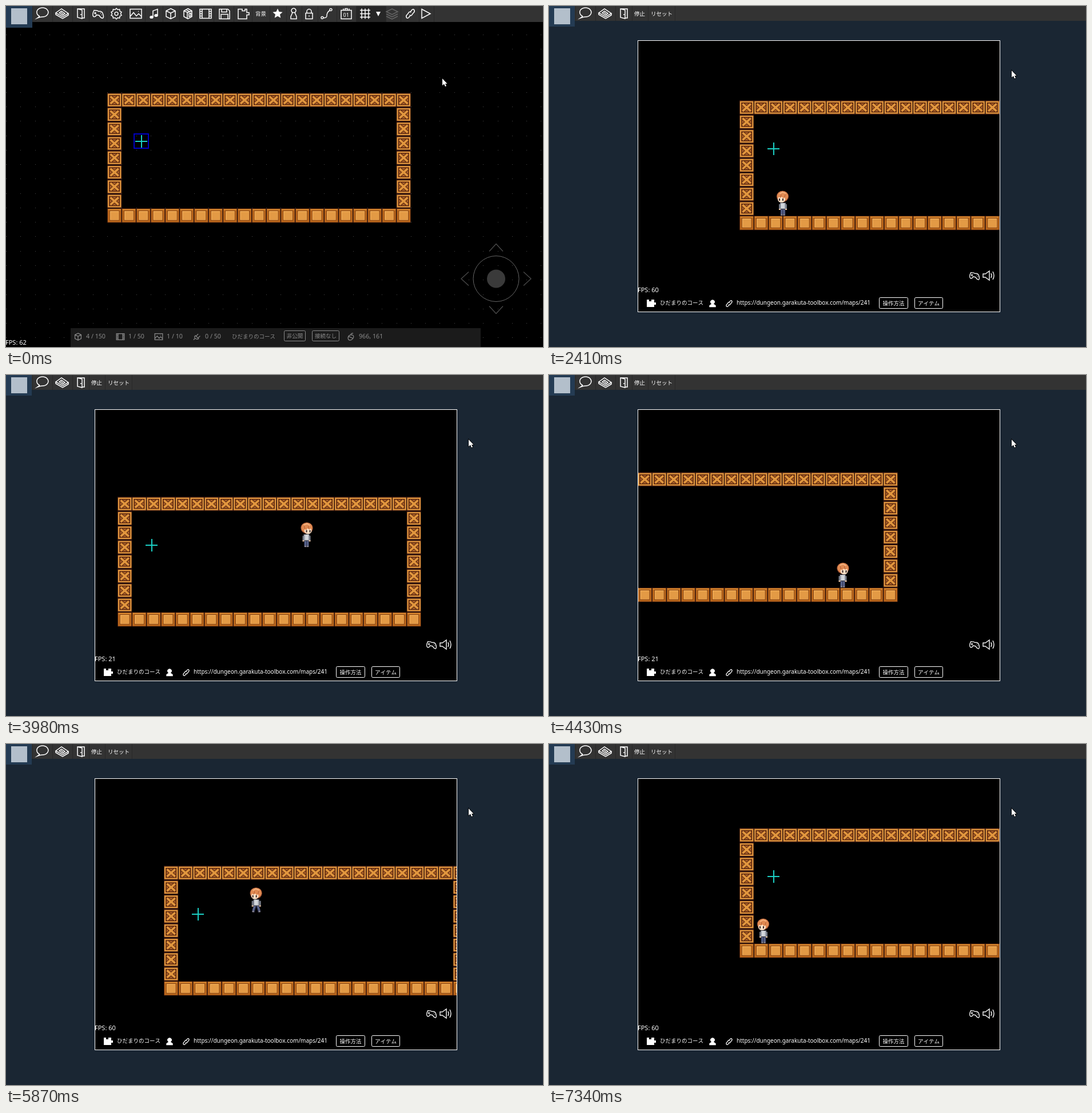
An HTML page with a canvas that plays this animation: 939 by 597 pixels, repeating every 7.9 s.

```html
<!DOCTYPE html>
<html lang="ja">
<head>
<meta charset="utf-8">
<style>
html, body { margin: 0; width: 100%; height: 100%; overflow: hidden; background: #000; }
canvas { display: block; }
</style>
</head>
<body>
<canvas id="stage" width="939" height="597"></canvas>
<script>
const c = document.getElementById('stage').getContext('2d');
const LOOP = 7900, TILE = 25.28, SPEED = 0.222;
const FONT = '"Noto Sans", "Noto Sans CJK JP", "Noto Sans CJK", sans-serif';
const TITLE = 'ひだまりのコース';
const clamp = (v, a, b) => Math.min(b, Math.max(a, v));

const beats = [[0, 1], [530, 8], [1210, 9], [2010, 5], [2410, 5], [2850, 7], [3460, 3], [3720, 8],
  [4430, 2], [4600, 10], [5460, 5], [5870, 5], [6310, 10], [7160, 2], [7340, 1], [LOOP, 1]];

function snap(t) {
  const i = beats.findIndex(b => b[0] > t) - 1;
  const [start, steps] = beats[i];
  const size = (beats[i + 1][0] - start) / steps;
  return start + Math.floor((t - start) / size + 1e-6) * size;
}

// Drawing helpers
function rect(x, y, w, h, color) {
  c.fillStyle = color;
  c.fillRect(x, y, w, h);
}

function line(color, width, ...pts) {
  c.strokeStyle = color;
  c.lineWidth = width;
  c.beginPath();
  for (let i = 0; i < pts.length; i += 2) c.lineTo(pts[i], pts[i + 1]);
  c.stroke();
}

function oval(x, y, rx, ry, color) {
  c.fillStyle = color;
  c.beginPath();
  c.ellipse(x, y, rx, ry, 0, 0, 7);
  c.fill();
}

function arc(x, y, r, from, to, color, width) {
  c.strokeStyle = color;
  c.lineWidth = width;
  c.beginPath();
  c.arc(x, y, r, from, to);
  c.stroke();
}

function text(s, x, y, color = '#fff', size = 9.5) {
  c.font = size + 'px ' + FONT;
  c.fillStyle = color;
  c.fillText(s, x, y);
}

function button(s, x, y, w, h, color) {
  c.strokeStyle = color;
  c.lineWidth = 1;
  c.beginPath();
  c.roundRect(x + .5, y + .5, w, h, 2);
  c.stroke();
  c.textAlign = 'center';
  text(s, x + w / 2 + .5, y + h / 2 + 4, color);
  c.textAlign = 'left';
}

const ring = (n, out, inn) => 'M' + Array.from({ length: n }, (_, i) => {
  const a = i * 2 * Math.PI / n - Math.PI / 2, r = i % 2 ? inn : out;
  return (r * Math.cos(a)).toFixed(1) + ' ' + (r * Math.sin(a)).toFixed(1);
}).join('L') + 'Z';

const icons = {
  chat: 'M-5 6A10 8 0 1 1 0 7Q-4 7-9 9L-5 6',
  book: 'M-11-1L-1-8 11 0 1 6ZM-11-1V2L1 9 11 3V0M-5-1L-1-4 5 0 1 3ZM-2-2L2 1',
  door: 'M-2-8H6V8H2M-6-8L2-6V9L-6 7ZM-6-8H6M0 1V3',
  pad: 'M-7-6Q-1-6 1-4 6-5 8-1 11 6 8 8 5 8 2 3L-3 2Q-4 6-8 5-11 2-7-6ZM-7-1L-3-1M-5-3V1M4-1h1M6 2h1',
  gear: ring(20, 9.5, 7.5) + 'M3 0A3 3 0 1 1 3-.1',
  image: 'M-10-8H10V8H-10ZM-10 5L-4-2 1 4 5 0 10 5M4-4h1',
  cube: 'M0-9L8-5V5L0 9-8 5V-5ZM-8-5L0-1 8-5M0-1V9',
  boxes: 'M0-9L7-5V5L0 9-7 5V-5ZM-7-5L0-2 7-5M-1-2V8M-3-7L4-3M2 0L5-1V4L2 5Z',
  film: 'M-10-8H10V8H-10ZM-6-8V8M6-8V8M-10-4h4M-10 0h4M-10 4h4M6-4h4M6 0h4M6 4h4',
  disk: 'M-9-8H6L9-5V9H-9ZM-5-8V-3H4V-8M-6 9V1H6V9',
  piece: 'M-9-8H-2V-5H3V-8H6V-2H10V2H6V9H-9Z',
  pawn: 'M2-2A4 4 0 1 0-2-2L-5 5V9H5V5ZM-2-2H2',
  lock: 'M-6-1H6V9H-6ZM-4-1V-4A4 4 0 0 1 4-4V-1M0 3V5',
  path: 'M-6 7Q1 8 0 2 1-4 6-6M-6 7A2 2 0 1 1-6 6.9M9-7A2 2 0 1 1 9-7.1',
  date: 'M-9-6H9V9H-9ZM-5-9V-6M5-9V-6M-2-6V-9H2V-6',
  grid: 'M-9-6H9M-9 0H9M-9 6H9M-6-9V9M0-9V9M6-9V9',
  layers: 'M0-8L10-3 0 2-10-3ZM-10 1L0 6 10 1M-10 5L0 10 10 5',
  link: 'M0-3L3-7Q6-9 7-6T5-1L2 3Q0 4-1 2M0 3L-3 7Q-6 9-7 6T-5 1L-2-3Q0-4 1-2',
  play: 'M-7-8L8 0-7 8Z',
  plug: 'M-9 8L-5 4M-5 4Q-8 0-4-3L4 5Q0 8-5 4M-2-2L3-7M3 3L8-2',
  mouse: 'M-7 5Q-8-3 0-5 8-5 7 1 5 8-2 9-6 9-7 5ZM-6-1L5 4M0-5Q0-9 6-9',
  sound: 'M-10-3H-6L1-8V8L-6 3H-10ZM4-4Q6 0 4 4M7-7Q11 0 7 7',
  note: 'M-2 6V-5L6-8V3',
  star: ring(10, 9, 4.2),
  block: 'M-8-6H-4V-3H0V-6H5V-1H8V3H5V7H-8Z',
  person: 'M-2 1Q-5-1-4-4 0-9 4-4 5-1 2 1L6 4V7H-6V4Z'
};
for (const k in icons) icons[k] = new Path2D(icons[k]);

function icon(name, x, y, color = '#fff', size = 1, solid = false) {
  c.save();
  c.translate(x, y);
  c.scale(size, size);
  c.lineWidth = 1.5 / Math.sqrt(size);
  c.strokeStyle = c.fillStyle = color;
  solid ? c.fill(icons[name]) : c.stroke(icons[name]);
  c.restore();
}

// Map, in pixels from its top left corner
function crate(col, row) {
  c.save();
  c.translate(col * TILE, row * TILE);
  c.scale(TILE / 32, TILE / 32);
  rect(0, 0, 32, 32, '#32140f');
  if (row === 8) {
    rect(1, 1, 30, 30, '#b9661b');
    rect(2, 2, 28, 2, '#d98c35');
    rect(5, 5, 22, 22, '#7a3a0f');
    rect(6, 6, 20, 20, '#f0ab55');
    rect(8, 8, 17, 17, '#e39a45');
  } else {
    rect(1, 2, 30, 28, '#e1963e');
    rect(4, 5, 24, 22, '#5a260f');
    rect(6, 7, 20, 18, '#b0652a');
    for (const [color, width] of [['#5a260f', 7.5], ['#e1963e', 4.8]]) {
      line(color, width, 25, 8, 7, 24);
      line(color, width, 7, 8, 25, 24);
    }
  }
  c.restore();
}

function map(marked) {
  for (let row = 0; row < 9; row++)
    for (let col = 0; col < 21; col += row % 8 ? 20 : 1) crate(col, row);
  if (marked) {
    c.strokeStyle = '#0000c4';
    c.lineWidth = 2;
    c.strokeRect(47, 72, 25, 25);
  }
  line('#1bcfc4', 2, 49, 85, 70, 85);
  line('#1bcfc4', 2, 60, 74, 60, 96);
}

// Motion of the player and of the camera trailing behind
const walks = [[2751, 4366, 1], [4641, 6409, -1]];
const walkX = t => walks.reduce((x, [from, to, dir]) => x + dir * SPEED * (clamp(t, from, to) - from), 76);

function jump(t, start) {
  const u = clamp((t - start) / 495, 0, 2);
  return 126 * u * (2 - u);
}

const lift = t => Math.max(0, 92 - .000525 * Math.max(0, t - 1780) ** 2) + jump(t, 3247) + jump(t, 5270);

function camera(t) {
  let x = 76, y = 92;
  for (let s = 1700; s < t; s += 10) {
    x += (walkX(s) - x) * .05;
    y += (lift(s) - y) * .05;
  }
  return [Math.round(Math.min(333, 482 - x)), Math.round(Math.min(213, 147 + y))];
}

function player(t) {
  const right = t > walks[0][0] && t < walks[1][0];
  const moving = walks.some(([from, to]) => t > from && t < to);
  const step = moving ? [0, 1, 0, -1][Math.floor((t - 3400) / 180 + 20) % 4] : 0;
  c.save();
  c.translate(walkX(t), 202 - lift(t));
  if (right) c.scale(-1, 1);
  // legs
  for (const side of [-1, 1]) {
    const foot = side * (2 + 3.5 * Math.abs(step));
    line('#282a45', 5, side * 1.8, -13, foot, -.3);
    line('#58648c', 3.2, side * 1.8, -13, foot, -3);
    line('#8d8a94', 2.5, foot - 1.5, -1.5, foot + 1.5, -1.5);
  }
  // body and arms
  rect(-5.5, -23, 11, 12, '#33333d');
  rect(-4.5, -22, 9, 10, '#b7bcc5');
  rect(-3, -22, 5, 9, '#d3d7dc');
  rect(-7 - step, -20, 3, 9, '#777d89');
  rect(4 + step, -20, 3, 9, '#777d89');
  rect(-7 - step, -12, 3, 2, '#f2c8a5');
  rect(4 + step, -12, 3, 2, '#f2c8a5');
  // head
  oval(-.5, -33.5, 10.7, 10, '#84432a');
  oval(-.5, -34, 9.8, 9, '#e08a52');
  oval(-2.5, -28.5, 6.5, 5.5, '#fbe0c6');
  c.fillStyle = '#e08a52';
  c.beginPath();
  c.moveTo(-9.5, -36);
  for (const [x, y] of [[-10, -30], [-7, -33], [-5, -31], [-2, -33], [1, -30], [3, -32], [5, -27], [9, -34]]) c.lineTo(x, y);
  c.fill();
  line('#f6b988', 1.5, -6, -38, -1, -41, 5, -39);
  line('#ad5c35', 1, -3, -37, -4, -32);
  line('#ad5c35', 1, 4, -37, 3, -32);
  rect(-7, -30, 2, 4, '#3a2a2a');
  rect(-1, -30, 2, 4, '#3a2a2a');
  c.restore();
}

// Toolbars
function toolbar(dividers, extra) {
  const height = 26 + extra * 2;
  rect(0, 0, 939, height, '#333');
  for (const x of dividers) rect(x, 0, 1, height, '#292929');
  rect(0, 0, 45 + extra, 36 + extra * 2, '#243b53');
  rect(9, 4, 28, 28, '#b3bfcb');
  icon('chat', 64, 12);
  icon('book', 98, 13);
  icon('door', 131, 13);
}

function editor(t) {
  rect(0, 0, 939, 597, '#000');
  for (let y = 2; y < 24; y++)
    for (let x = 0; x < 38; x++) rect(Math.round(x * TILE), Math.round(y * TILE) - 1, 1, 1, '#4a4a4a');
  c.save();
  c.translate(177, 152);
  map(true);
  c.restore();

  arc(857, 477.5, 40, 0, 7, '#666', 1);
  oval(857, 477.5, 16, 16, '#3a3a3a');
  for (let i = 0; i < 4; i++) {
    c.save();
    c.translate(857, 477.5);
    c.rotate(i * Math.PI / 2);
    line('#4c4c4c', 1.2, -12, -48, 0, -61, 12, -48);
    c.restore();
  }

  rect(113, 564, 717, 33, '#1b1b1b');
  const gray = '#8a8a8a';
  const stats = [['cube', 126, '4 / 150'], ['film', 200, '1 / 50'], ['image', 267, '1 / 10'],
    ['plug', 334, '0 / 50'], ['mouse', 603, '966, 161']];
  for (const [name, x, s] of stats) {
    icon(name, x, 579, gray, .68);
    text(s, x + 14, 582, gray, 10.7);
  }
  text(TITLE, 395, 582, gray);
  button('非公開', 486, 568, 37, 18, gray);
  button('接続なし', 535, 568, 47, 18, gray);
  text('FPS: ' + (t < 790 ? 62 : 60), -1, 593, '#fff', 11);

  toolbar([46, 81, 116, 145, 176, 210, 243, 274, 303, 334, 363, 398, 430, 461, 490, 517, 545, 578, 612, 664, 690, 722, 748], 1);
  rect(613, 0, 51, 28, '#262626');
  const tools = { pad: 161, gear: 193, image: 227, note: 259, cube: 288, boxes: 318, film: 349, disk: 382,
    piece: 415, pawn: 503, lock: 530, path: 561, date: 595, grid: 628, link: 707, play: 734 };
  for (const name in tools) icon(name, tools[name], 13.5);
  icon('layers', 675, 13, '#666');
  icon('star', 475, 13.5, '#fff', 1, true);
  oval(254.5, 19.5, 3.2, 2.6, '#fff');
  oval(262.5, 16.5, 3.2, 2.6, '#fff');
  text('背景', 436, 17);
  text('01', 589.5, 19, '#fff', 9);
  c.fillStyle = '#fff';
  c.fill(new Path2D('M647 10H655L651 18Z'));
}

function game(t) {
  const loading = t < 1650;
  rect(0, 0, 939, 597, '#1a2633');
  toolbar([46, 81, 116, 145, 173, 220], 0);
  text('停止', 149, 17);
  text('リセット', 178, 17);
  rect(155, 60, 634, 476, '#fff');
  rect(156, 61, 632, 474, '#000');

  c.save();
  c.beginPath();
  c.rect(156, 61, 632, 474);
  c.clip();
  if (loading) {
    c.translate(155.5, 60.5);
    c.scale(633 / 939, 475 / 597);
    c.translate(177, 152);
    map(true);
  } else {
    c.translate(...camera(t));
    map(false);
    player(t);
  }
  c.restore();

  if (loading) {
    rect(0, 0, 939, 597, 'rgba(0,0,0,.5)');
    const a = (t - 1210) / 1000 * 2 * Math.PI;
    arc(472, 298, 21.5, 0, 7, '#999', 1);
    for (const half of [0, Math.PI]) arc(472, 298, 21, a + half, a + half + 1.4, '#6c6c6c', 4);
  }

  icon('pad', 744, 472, '#eee', .9);
  icon('sound', 769, 472, '#eee');
  text('FPS: ' + (t > 2590 && t < 5100 ? 21 : 60), 155, 501, '#fff', 11);
  icon('block', 179, 520, '#fff', 1, true);
  text(TITLE, 194, 523);
  icon('person', 286, 520.5, '#fff', .95, true);
  icon('link', 315, 521, '#fff', .7);
  text('https://dungeon.garakuta-toolbox.com/maps/241', 328, 523, '#fff', 10);
  button('操作方法', 577, 510, 50, 19, '#fff');
  button('アイテム', 639, 510, 49, 19, '#fff');
}

// Mouse pointer: [time, x, y]
const trail = [[0, 763, 127], [530, 763, 127], [1030, 734, 16], [1120, 734, 16], [1210, 734, 23], [1300, 734, 23],
  [1900, 809, 113], [LOOP, 809, 113]];

function pointer(t) {
  const i = trail.findIndex(p => p[0] > t);
  const [t0, x0, y0] = trail[i - 1], [t1, x1, y1] = trail[i];
  const k = (t - t0) / (t1 - t0);
  c.save();
  c.translate(x0 + (x1 - x0) * k, y0 + (y1 - y0) * k);
  const shape = new Path2D('M0 0V12L3 9.5 5 14 7 13 5 9H8.5Z');
  c.strokeStyle = '#000';
  c.lineWidth = 1.5;
  c.stroke(shape);
  c.fillStyle = '#fff';
  c.fill(shape);
  c.restore();
}

function frame() {
  const t = snap(performance.now() % LOOP);
  t < 1210 ? editor(t) : game(t);
  pointer(t);
  requestAnimationFrame(frame);
}
frame();
</script>
</body>
</html>
```
